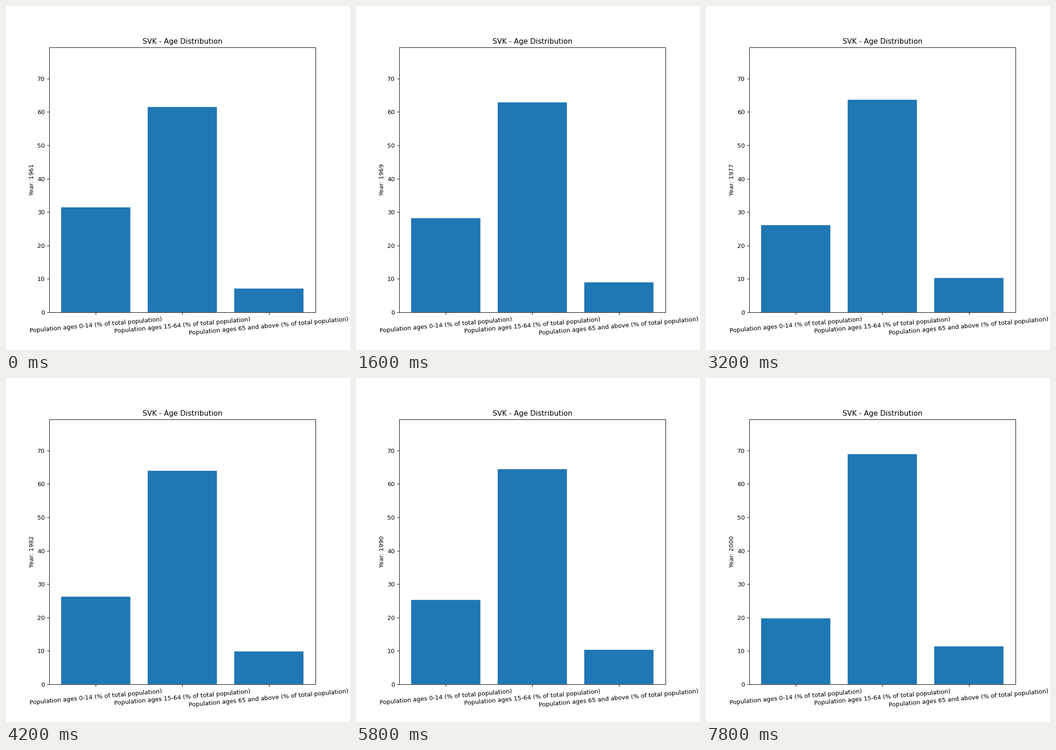
Recreate the animation shown at these times as a matplotlib script. Size 748x748 px, loop 8000 ms.

```python
import matplotlib.pyplot as plt
import numpy as np
from matplotlib.animation import FuncAnimation

FIRST_YEAR, YEARS, STEP_MS = 1961, 40, 200

GROUPS = ("0-14", "15-64", "65 and above")


def ramp(year, start, end, power=1.0):
    """Rise from 0 to 1 between two years; power bends the curve."""
    return np.clip((year - start) / (end - start), 0, 1) ** power


def shares(year):
    working = (61.5 + 2.55 * ramp(year, 1961, 1973, 1.5)
               - 0.38 * ramp(year, 1973, 1977)
               + 0.78 * ramp(year, 1977, 1990)
               + 4.5 * ramp(year, 1990, 2000, 1.1))
    old = (7.08 + 3.32 * ramp(year, 1961, 1978, 0.78)
           - 1.04 * ramp(year, 1978, 1984, 1.4)
           + 0.94 * ramp(year, 1984, 1990, 1.2)
           + 1.03 * ramp(year, 1990, 2000))
    return 100 - working - old, working, old


fig, ax = plt.subplots(figsize=(8, 8), dpi=93.5)
labels = [f"Population ages {group} (% of total population)" for group in GROUPS]
bars = ax.bar(labels, shares(FIRST_YEAR), snap=False)
ax.set_ylim(0, 79.4)
ax.set_title("SVK - Age Distribution")
ax.tick_params(axis="x", rotation=5)


def update(i):
    year = FIRST_YEAR + i
    for bar, share in zip(bars, shares(year)):
        bar.set_height(share)
    ax.set_ylabel(f"Year: {year}")
    return list(bars)


anim = FuncAnimation(fig, update, frames=YEARS, interval=STEP_MS,
                     init_func=lambda: update(0), repeat=True, repeat_delay=0)
plt.show()
```
